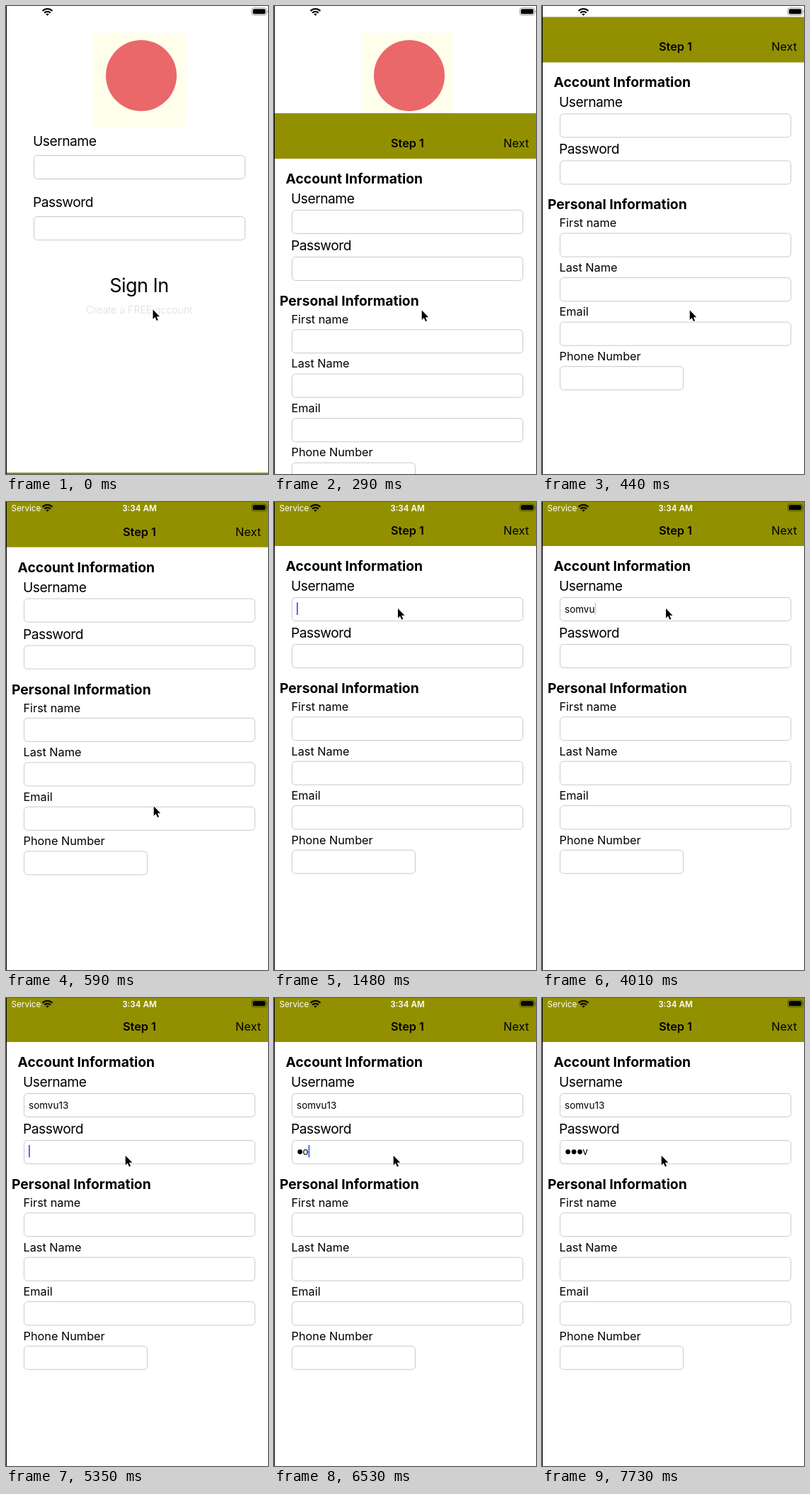
An HTML page for the animation above (8000 ms loop, 370x659 px).

```html
<!DOCTYPE html>
<html lang="en">
<head>
<meta charset="utf-8">
<title>Sign-up form</title>
<style>
  html, body { margin: 0; width: 100%; height: 100%; overflow: hidden; background: #fff; }
  svg { display: block; font-family: Inter, Roboto, sans-serif; }
  .label { font-size: 19.3px; letter-spacing: -.028em; }
  .head { font-size: 19.3px; font-weight: 700; }
  .small { font-size: 16.3px; }
  .bold { font-weight: 600; }
  .mid { text-anchor: middle; }
  .end { text-anchor: end; }
  .big { font-size: 27px; letter-spacing: -.02em; }
  .link { font-size: 14.4px; font-weight: 200; fill: #cfcfcf; }
  .typed { font-size: 13.5px; }
  .status { font-size: 11.7px; fill: #fff; }
  .box { fill: #fff; stroke: #c9c9c9; }
</style>
</head>
<body>
<svg width="370" height="659" viewBox="0 0 370 659">
  <rect width="370" height="659" fill="#fff"/>
  <g id="login">
    <rect x="123" y="38" width="131" height="132" fill="#ffffec"/>
    <circle cx="191" cy="98" r="50" fill="#ea686a"/>
  </g>
  <g id="sheet">
    <rect y="-2" width="370" height="662" fill="#fff"/>
    <rect y="-2" width="370" height="64" fill="#929000"/>
  </g>
  <g id="status">
    <g fill="none" stroke="#000" stroke-width="2.2">
      <path d="M51.6 6.9a9.7 9.7 0 0 1 13.8 0"/>
      <path d="M54.2 9.7a6 6 0 0 1 8.6 0"/>
    </g>
    <path d="M58.5 13.8l-2.2-2.3a3.1 3.1 0 0 1 4.4 0z"/>
    <rect x="347" y="2.8" width="21" height="10" rx="3" fill="none" stroke="#000" stroke-opacity=".4"/>
    <rect x="348.6" y="4.3" width="17.8" height="7" rx="1.8"/>
    <path d="M369 6.2q1.3 1.6 0 3.2z" opacity=".5"/>
  </g>
  <rect id="caret" width="1.8" height="17.5" fill="#3a63dc"/>
  <path id="pointer" d="M0 0v13.5l3-2.9 2.2 5 2.1-.9-2.1-4.9h4.3z" stroke="#fff" stroke-width="1.8" paint-order="stroke"/>
  <rect width="1" height="659"/>
</svg>
<script>
const $ = id => document.getElementById(id);

function add(parent, tag, attrs, content = '') {
  const el = document.createElementNS('http://www.w3.org/2000/svg', tag);
  for (const k in attrs) el.setAttribute(k, attrs[k]);
  el.textContent = content;
  return $(parent).appendChild(el);
}
const text = (parent, cls, x, y, s) => add(parent, 'text', { class: cls, x, y }, s);
const box = (parent, x, y, width) =>
  add(parent, 'rect', { class: 'box', x, y, width, height: 33, rx: 5 });

// A pair of labelled fields, one below the other
function credentials(parent, x, y, width, gap) {
  ['Username', 'Password'].forEach((s, i) => {
    text(parent, 'label', x - 1.5, y + i * gap, s);
    box(parent, x, y + i * gap + (gap > 70 ? 13.5 : 9.5), width);
  });
}

credentials('login', 39.5, 197, 298, 86);
text('login', 'big mid', 188, 403, 'Sign In');
text('login', 'link mid', 188, 433, 'Create a FREE account');

text('sheet', 'small bold mid', 188.5, 46, 'Step 1');
text('sheet', 'small end', 360, 46, 'Next');
text('sheet', 'head', 16.5, 97, 'Account Information');
credentials('sheet', 25.5, 125, 326, 66);
text('sheet', 'head', 8, 269, 'Personal Information');
['First name', 'Last Name', 'Email', 'Phone Number'].forEach((s, i) => {
  const y = 294 + i * 62.5;
  text('sheet', 'small', 24.5, y, s);
  box('sheet', 25.5, y + 8.7, i < 3 ? 326 : 174);
});
text('status', 'status', 7.5, 12.8, 'Service');
text('status', 'status bold mid', 188.5, 12.8, '3:34 AM');

const LEFT = 32, PITCH = 8.4;
const inputs = [155.5, 221.3].map(y => text('sheet', 'typed', LEFT, y, ''));
const dots = [0, 1, 2].map(i =>
  add('sheet', 'circle', { cx: LEFT + 4.7 + i * PITCH, cy: 216.6, r: 3.4 }));

// The screen refreshes in steps; all times below count them
const STEP = 148.5, LAG = 8;

// One key per step; an empty burst only focuses the field
const bursts = [
  { field: 0, start: 10, keys: '' }, { field: 0, start: 19, keys: 'somvu' },
  { field: 0, start: 28, keys: '13' }, { field: 1, start: 36, keys: '' },
  { field: 1, start: 43, keys: 'som' }, { field: 1, start: 47, keys: 'v' }
];

// step, x, y
const path = [
  [0, 207.5, 427.5], [1, 208.7, 428.5], [5, 208.7, 428.5], [8, 175, 150],
  [30, 175, 150], [33, 177, 355], [34, 168.7, 222]
];

function pointerAt(step) {
  const i = path.findLastIndex(p => p[0] <= step);
  const a = path[i], b = path[i + 1] || a;
  const u = (step - a[0]) / (b[0] - a[0] || 1), ease = u * u * (3 - 2 * u);
  return [1, 2].map(k => a[k] + (b[k] - a[k]) * ease);
}

// Critically damped spring from the bottom edge
function slide(step) {
  const u = Math.max(0, 18.26 * (step * STEP - LAG - 136) / 1000);
  return 659 * (1 + u) * Math.exp(-u);
}

// Solid, then fading, then off, counted from the last key
function blink(age) {
  const phase = age % 7;
  return phase < 4 ? 1 : phase < 5 ? .3 : 0;
}

function draw(now) {
  const step = Math.floor((now % 8000 + LAG) / STEP);
  $('sheet').setAttribute('transform', `translate(0 ${slide(step).toFixed(2)})`);

  const values = ['', ''];
  let field = 0, lastKey = null;
  for (const b of bursts.filter(b => b.start <= step)) {
    values[b.field] += b.keys.slice(0, step - b.start + 1);
    field = b.field;
    lastKey = Math.min(step, b.start + Math.max(0, b.keys.length - 1));
  }

  // Only the newest password character stays readable
  const hidden = Math.max(0, values[1].length - 1);
  inputs[0].textContent = values[0];
  inputs[1].textContent = values[1].slice(hidden);
  inputs[1].setAttribute('x', LEFT + hidden * PITCH);
  dots.forEach((d, i) => d.setAttribute('opacity', i < hidden ? 1 : 0));

  const caret = $('caret');
  caret.setAttribute('x', LEFT + field * hidden * PITCH + inputs[field].getComputedTextLength());
  caret.setAttribute('y', field ? 207 : 141.5);
  caret.setAttribute('opacity', lastKey === null ? 0 : blink(step - lastKey));

  $('pointer').setAttribute('transform', `translate(${pointerAt(step)})`);
  requestAnimationFrame(() => draw(performance.now()));
}
draw(0);
</script>
</body>
</html>
```
